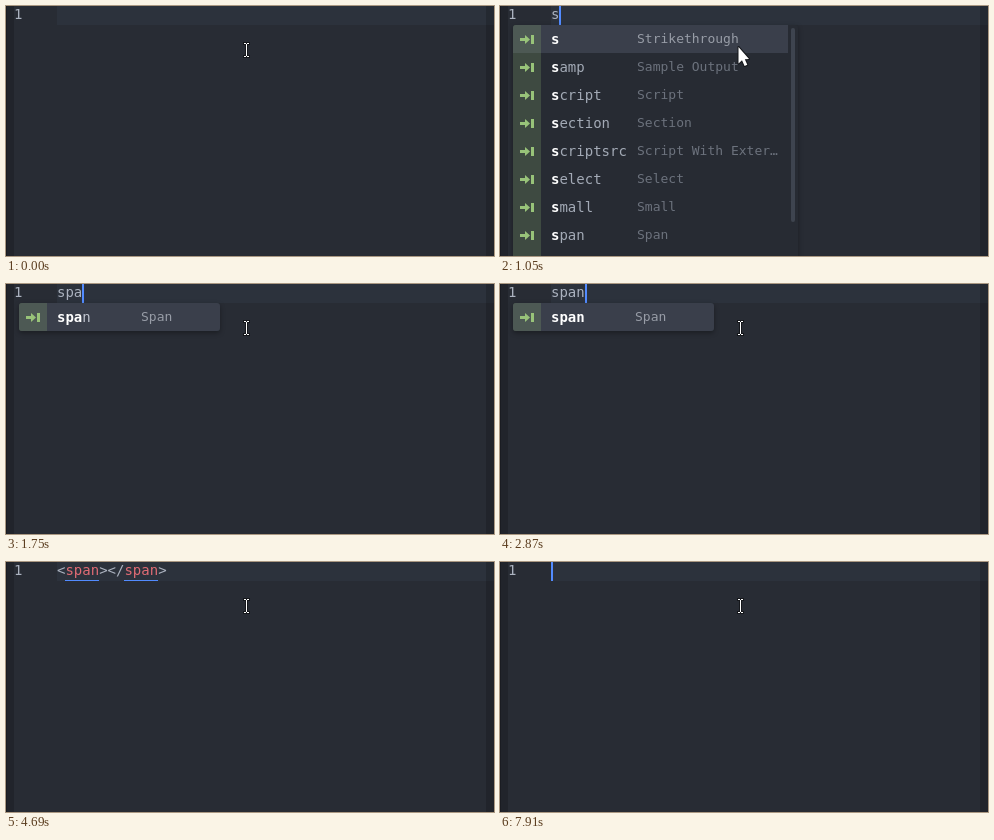
An HTML page with a canvas for the animation above (8000 ms loop, 488 px wide and 250 px high).

```html
<!DOCTYPE html>
<html lang="en">
<head>
<meta charset="utf-8">
<title>Tag completion in an editor</title>
<style>
html, body { margin: 0; width: 100%; height: 100%; overflow: hidden; background: #282c34; }
canvas { display: block; width: 488px; height: 250px; }
</style>
</head>
<body>
<canvas id="stage" width="488" height="250"></canvas>
<script>
const ctx = document.getElementById('stage').getContext('2d');
const LOOP = 8000;
const TEXT_X = 51;
const LINE_H = 19;
const ROW_H = 28;
const CHAR_W = 14 * 0.602;
const MONO = '"DejaVu Sans Mono", monospace';
const GREY = '#abb2bf', RED = '#e06c75', BLUE = '#528bff';

// Each state lists the time it starts; unspecified fields carry over.
const steps = [
  { at: 0, text: '', col: 0, on: false, popup: null, links: [], selected: false },
  { at: 140, on: true },
  { at: 560, on: false },
  { at: 910, text: 's', col: 1, on: true },
  { at: 1050, popup: 'all' },
  { at: 1400, text: 'sp', col: 2, popup: 'some' },
  { at: 1680, text: 'spa', col: 3 },
  { at: 1750, popup: 'one', match: 'spa' },
  { at: 1960, text: 'span', col: 4 },
  { at: 2030, match: 'span' },
  { at: 2450, on: false },
  { at: 2870, on: true },
  { at: 3290, text: '<span></span>', col: 6, popup: null, links: [1, 8] },
  { at: 3850, on: false },
  { at: 4130, col: 5, on: true },
  { at: 4690, on: false },
  { at: 4760, text: '<span ></span>', col: 6, on: true, links: [1, 9] },
  { at: 5250, on: false },
  { at: 5530, text: '<span />', col: 7, on: true, links: [] },
  { at: 6020, on: false },
  { at: 6440, col: 8, on: true },
  { at: 7000, on: false },
  { at: 7420, col: 0, on: true, selected: true },
  { at: 7910, text: '', selected: false }
];

const titles = {
  s: 'Strikethrough', samp: 'Sample Output', script: 'Script', section: 'Section',
  scriptsrc: 'Script With Exter…', select: 'Select', small: 'Small', span: 'Span',
  sup: 'Superscript'
};

const popups = {
  all: { names: ['s', 'samp', 'script', 'section', 'scriptsrc', 'select', 'small', 'span'],
         match: 's', right: 288, titleX: 137, scroll: true },
  some: { names: ['span', 'sup', 'samp', 'script', 'scriptsrc'],
          match: 'sp', right: 298, titleX: 137 },
  one: { names: ['span'], right: 214, titleX: 135 }
};

function stateAt(time) {
  const state = {};
  for (const step of steps) if (step.at <= time) Object.assign(state, step);
  return state;
}

function rect(color, x, y, w, h) {
  ctx.fillStyle = color;
  ctx.fillRect(x, y, w, h);
}

function write(text, x, y, color, size = 14, weight = 'normal') {
  ctx.font = `${weight} ${size}px ${MONO}`;
  ctx.fillStyle = color;
  ctx.fillText(text, x, y);
}

function polygon(points) {
  ctx.beginPath();
  points.forEach(([x, y]) => ctx.lineTo(x, y));
  ctx.closePath();
}

function drawCode(text) {
  let x = TEXT_X;
  const tagged = text.startsWith('<');
  for (const part of text.match(/[a-z]+|[^a-z]+/g) || []) {
    write(part, x, 13, tagged && /[a-z]/.test(part) ? RED : GREY);
    x += part.length * CHAR_W;
  }
}

function drawLine(state) {
  if (state.selected) rect('#3e4451', TEXT_X, 0, state.text.length * CHAR_W, LINE_H);
  else rect('#2c323c', TEXT_X, 0, 488 - TEXT_X, LINE_H);
  rect('rgba(0,0,0,.18)', 0, 0, 8, 250);
  rect('rgba(0,0,0,.18)', 480, 0, 8, 250);
  rect('rgba(0,0,0,.2)', 0, 0, 1, 250);
  write('1', 8, 13, state.selected ? '#636d83' : GREY);
  drawCode(state.text);
  for (const col of state.links) {
    rect(BLUE, Math.round(TEXT_X + col * CHAR_W), 18, Math.round(4 * CHAR_W), 1);
  }
  if (state.on) rect(BLUE, Math.round(TEXT_X + state.col * CHAR_W), 0, 2, LINE_H);
}

function drawIcon(y) {
  rect('#98c379', 20, y - 1, 6, 3);
  polygon([[25, y - 4], [30, y + 0.5], [25, y + 5]]);
  ctx.fill();
  rect('#98c379', 31, y - 4, 3, 9);
}

function drawName(name, match, y, selected) {
  let found = 0;
  [...name].forEach((char, i) => {
    const hit = char === match[found];
    if (hit) found++;
    write(char, TEXT_X + i * CHAR_W, y, hit ? '#ffffff' : selected ? '#c0c5cf' : '#a3aab6',
          14, hit ? 'bold' : 'normal');
  });
}

function drawPopup(state) {
  const { names, right, titleX, scroll, match = state.match } = popups[state.popup];
  const outer = scroll ? 298 : right;
  const height = scroll ? 260 : names.length * ROW_H;
  ctx.save();
  ctx.beginPath();
  ctx.roundRect(13, LINE_H, outer - 13, height, 3);
  ctx.shadowColor = 'rgba(0,0,0,.35)';
  ctx.shadowBlur = 5;
  ctx.shadowOffsetY = 2;
  ctx.fillStyle = '#272b33';
  ctx.fill();
  ctx.shadowColor = 'transparent';
  ctx.clip();
  rect('#3e4a41', 13, LINE_H, 28, height);
  names.forEach((name, i) => {
    const top = LINE_H + i * ROW_H;
    if (i === 0) {
      rect('#3a3f4b', 41, top, right - 41, ROW_H);
      rect('#4d5954', 13, top, 28, ROW_H);
    }
    drawIcon(top + 14);
    drawName(name, match, top + 19, i === 0);
    write(titles[name], titleX, top + 18, i === 0 ? '#989da7' : '#6c727d', 13);
  });
  if (scroll) {
    ctx.beginPath();
    ctx.roundRect(291, 22, 4, 194, 2);
    ctx.fillStyle = '#3e444f';
    ctx.fill();
  }
  ctx.restore();
}

function drawArrow() {
  polygon([[238.5, 41], [238.5, 57.5], [242, 54.2], [244.6, 60], [247.3, 58.8],
           [244.8, 53.2], [249, 53]]);
  ctx.lineWidth = 2;
  ctx.lineJoin = 'round';
  ctx.strokeStyle = '#15171b';
  ctx.stroke();
  ctx.fillStyle = '#ffffff';
  ctx.fill();
}

function drawBeam() {
  const bars = [[240, 38, 1, 12], [238, 37, 2, 1], [241, 37, 2, 1], [238, 50, 2, 1], [241, 50, 2, 1]];
  for (const [x, y, w, h] of bars) rect('#15171b', x - 1, y - 1, w + 2, h + 2);
  for (const bar of bars) rect('#ffffff', ...bar);
}

function draw(time) {
  const state = stateAt(time);
  rect('#282c34', 0, 0, 488, 250);
  drawLine(state);
  if (state.popup) drawPopup(state);
  if (state.popup && state.popup !== 'one') drawArrow();
  else drawBeam();
}

const start = performance.now();
function tick() {
  draw((performance.now() - start) % LOOP);
  requestAnimationFrame(tick);
}
tick();
</script>
</body>
</html>
```
